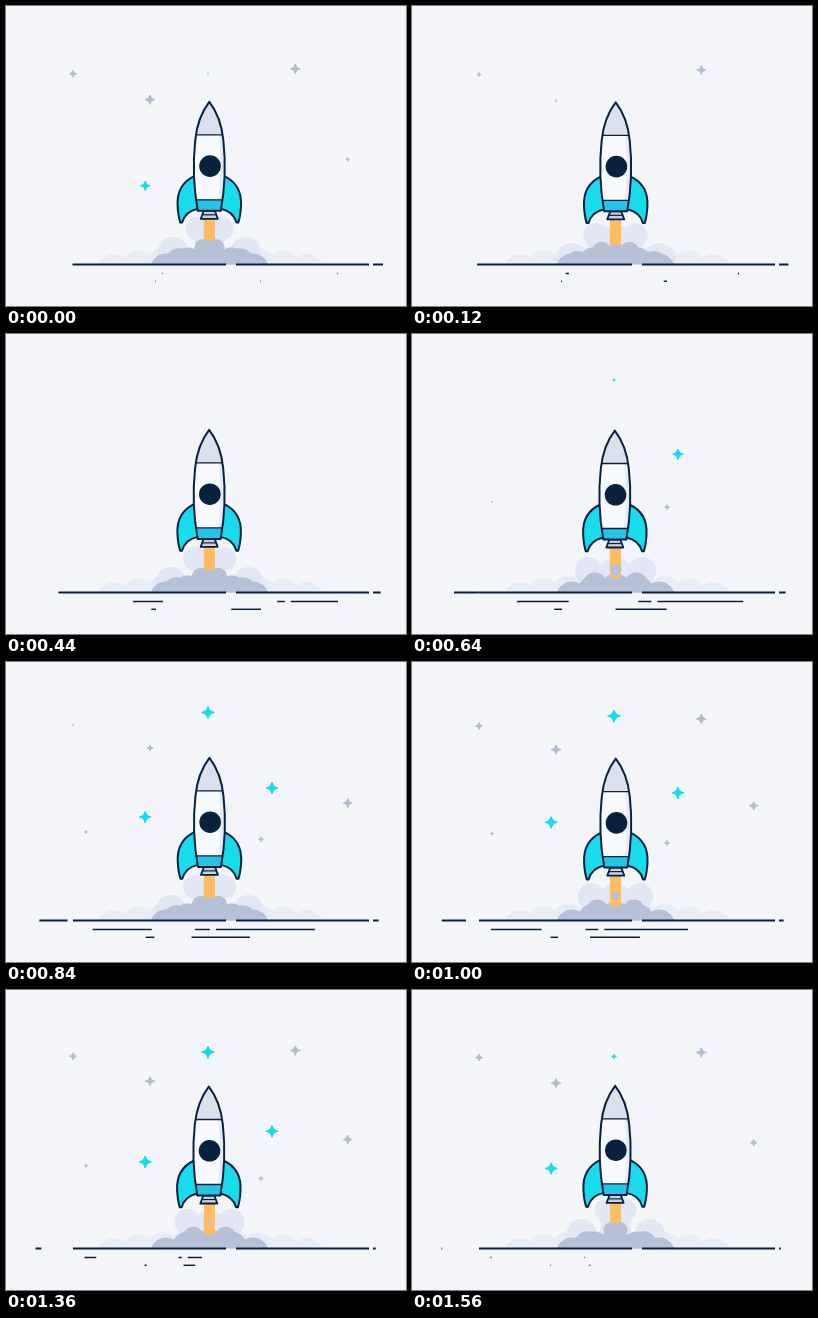
Animation, 400 px wide and 300 px high, one loop 1.6 s. Source, as an HTML page with a canvas:

```html
<!DOCTYPE html>
<html lang="en">
<head>
<meta charset="utf-8">
<title>Rocket launch</title>
<style>
html, body { margin: 0; width: 100%; height: 100%; overflow: hidden; background: #f3f5f9; }
canvas { display: block; width: 400px; height: 300px; }
</style>
</head>
<body>
<canvas id="stage"></canvas>
<script>
const LOOP = 1600, STEP = 40, PULSE = 400, BASE = 258.5, MID = 203.5;
const NAVY = '#08213e', CYAN = '#18dcec', GREY = '#b3bccf';
const FRONT = '#b6c1d6', BACK = '#e2e7f3', OUTER = '#e8ecf5';
const canvas = document.getElementById('stage');
const c = canvas.getContext('2d');
const dpr = window.devicePixelRatio || 1;
canvas.width = 400 * dpr;
canvas.height = 300 * dpr;

// In order of appearance: x, y at 840 ms, radius, fall per loop
const stars = [
  [255, 177.5, 3, 34], [266, 126, 6.2, 47], [80, 170, 2.1, 17],
  [202, 50.4, 6.5, 36], [341.7, 141, 4.8, 26], [139.2, 155, 6.3, 52],
  [144, 86, 5, 16], [67, 63, 3.9, 10], [289.3, 55.2, 5.2, 16]
];

// Each streak runs left: from, to, y, weight
const streaks = [
  [67, 30, BASE, 2], [157, 79, 267.5, 1.5], [255, 178, 275.3, 1.5], [150, 139, 275.3, 1.5]
];

const clamp = v => Math.max(0, Math.min(1, v));
const mix = (a, b, f) => a + (b - a) * f;
function ease(a, b, t) {
  const u = clamp((t - a) / (b - a));
  return u * u * (3 - 2 * u);
}

function star([x, y, size, fall], i, t) {
  const birth = 430 + 47 * i, life = 1080;
  const age = (t - birth + LOOP) % LOOP;
  const r = size * ease(0, 200, Math.min(age, life - age));
  if (r < .2) return;
  c.save();
  c.translate(x, y + fall * (birth + age - 840) / LOOP);
  c.scale(r, r);
  c.beginPath();
  c.moveTo(0, -.9);
  for (let k = 0; k < 4; k++) {
    c.quadraticCurveTo(.12, -.12, .9, 0);
    c.rotate(Math.PI / 2);
  }
  c.fillStyle = c.strokeStyle = size > 6 ? CYAN : GREY;
  c.lineWidth = .24;
  c.lineJoin = 'round';
  c.fill();
  c.stroke();
  c.restore();
}

function line(a, b, y, w = 2) {
  c.beginPath();
  c.moveTo(a, y);
  c.lineTo(b, y);
  c.lineWidth = w;
  c.strokeStyle = NAVY;
  c.stroke();
}

function ground(t) {
  const head = ease(0, 1050, t), tail = ease(600, 1600, t);
  for (const [from, to, y, w] of streaks)
    line(mix(from, to, head) - .5, mix(from, to, tail), y, w);

  // The long streak has a gap near its head
  const a = mix(332, 173, head), b = mix(332, 173, tail), gap = a + (b - a) * .12;
  line(a - .5, gap, 267.5, 1.5);
  line(Math.min(gap + 6, b), b, 267.5, 1.5);

  line(67, 220, BASE);
  line(230, 363, BASE);
  line(367, 377 - t * .0053, BASE);
}

function dot(x, y, r, color) {
  c.beginPath();
  c.arc(x, y, r, 0, 7);
  c.fillStyle = color;
  c.fill();
}

// A row of lobes, lower towards both ends
function mound(left, right, count, top, r, color) {
  for (let i = 0; i < count; i++) {
    const u = 2 * i / (count - 1) - 1;
    dot(mix(left + r, right - r, i / (count - 1)), top + r + 8 * u * u, r, color);
  }
}

// Twin puffs swell at the flame, then sink and spread
function backPuffs(age) {
  const s = ease(0, 230, age) ** 2, q = Math.max(0, (age - 230) / 300);
  for (const side of [-1, 1])
    dot(MID + side * (10 + 18 * q) * s, 220 + 18 * q, (11 + 3 * q) * s, BACK);
  dot(MID, 228 + 12 * q, 16 * s, BACK);
}

function frontPuffs(age) {
  const s = clamp(age / 230), q = Math.max(0, (age - 230) / 300);
  for (const side of [-1, 1])
    dot(MID + side * (4 + 18 * q) * s, 230 + 10 * s + 11 * q, (8 + 4 * q) * s, FRONT);
  dot(MID, 232 + 11 * s + 10 * q, 10 * s, FRONT);
}

function flame() {
  c.beginPath();
  c.moveTo(197.8, 212);
  c.lineTo(209, 212);
  c.lineTo(209, 242);
  c.quadraticCurveTo(207, 246, 204, 244);
  c.quadraticCurveTo(200, 246, 197.8, 242);
  c.fillStyle = '#ffbd63';
  c.fill();
}

function smoke(t) {
  const age = (t + 270) % PULSE;
  c.save();
  c.beginPath();
  c.rect(0, 150, 400, BASE - 150);
  c.clip();
  mound(91, 318, 9, 240, 17, OUTER);
  backPuffs(age + PULSE);
  backPuffs(age);
  mound(144, 263, 5, 239.5, 16, FRONT);
  frontPuffs(age + PULSE);
  flame();
  frontPuffs(age);
  c.restore();
}

function shape(d, fill, w = 2) {
  const p = new Path2D(d);
  c.fillStyle = fill;
  c.fill(p);
  if (w) {
    c.lineWidth = w;
    c.strokeStyle = NAVY;
    c.stroke(p);
  }
}

const fin = 'M189 171 C178 176 171 186 171.8 201 Q172.3 211 174.5 217.8 H176.3 Q179.5 206.5 192 204 Z';
const body = 'M203.5 97 C195 108 191 120 189.5 135 C187 158 188 184 192 206 L215 206 C219 184 220 158 217.5 135 C216 120 212 108 203.5 97 Z';

function rocket(t) {
  c.save();
  c.translate(.5 * Math.sin(t * Math.PI / 400) - .2, -.8 - .4 * Math.cos(t * Math.PI / 200));
  c.lineJoin = 'round';
  shape(fin, CYAN);
  c.save();
  c.translate(2 * MID, 0);
  c.scale(-1, 1);
  shape(fin, CYAN);
  c.restore();
  shape('M198 206 H209 L212 214 H195 Z', '#c8d0e2', 1.8);
  line(197, 210, 210, 1.2);
  c.save();
  c.clip(new Path2D(body));
  shape('M180 90 H230 V210 H180 Z', '#f8fafd', 0);
  shape('M213 130 Q217 165 211 206 H230 V130 Z', '#e6ebf7', 0);
  shape('M180 90 H230 V130 H180 Z', '#dce0ec', 0);
  shape('M180 195 H230 V210 H180 Z', '#23c6e6', 0);
  line(180, 230, 130, 1.3);
  line(180, 230, 195, 1.3);
  c.restore();
  c.lineWidth = 2;
  c.strokeStyle = NAVY;
  c.stroke(new Path2D(body));
  dot(204.2, 161.3, 10.8, NAVY);
  c.restore();
}

function draw(t) {
  c.setTransform(dpr, 0, 0, dpr, 0, 0);
  c.fillStyle = '#f3f5f9';
  c.fillRect(0, 0, 400, 300);
  stars.forEach((s, i) => star(s, i, t));
  smoke(t);
  rocket(t);
  ground(t);
}

let start;
function tick(now) {
  start ??= now;
  draw(Math.floor((now - start) / STEP) * STEP % LOOP);
  requestAnimationFrame(tick);
}
draw(0);
requestAnimationFrame(tick);
</script>
</body>
</html>
```
